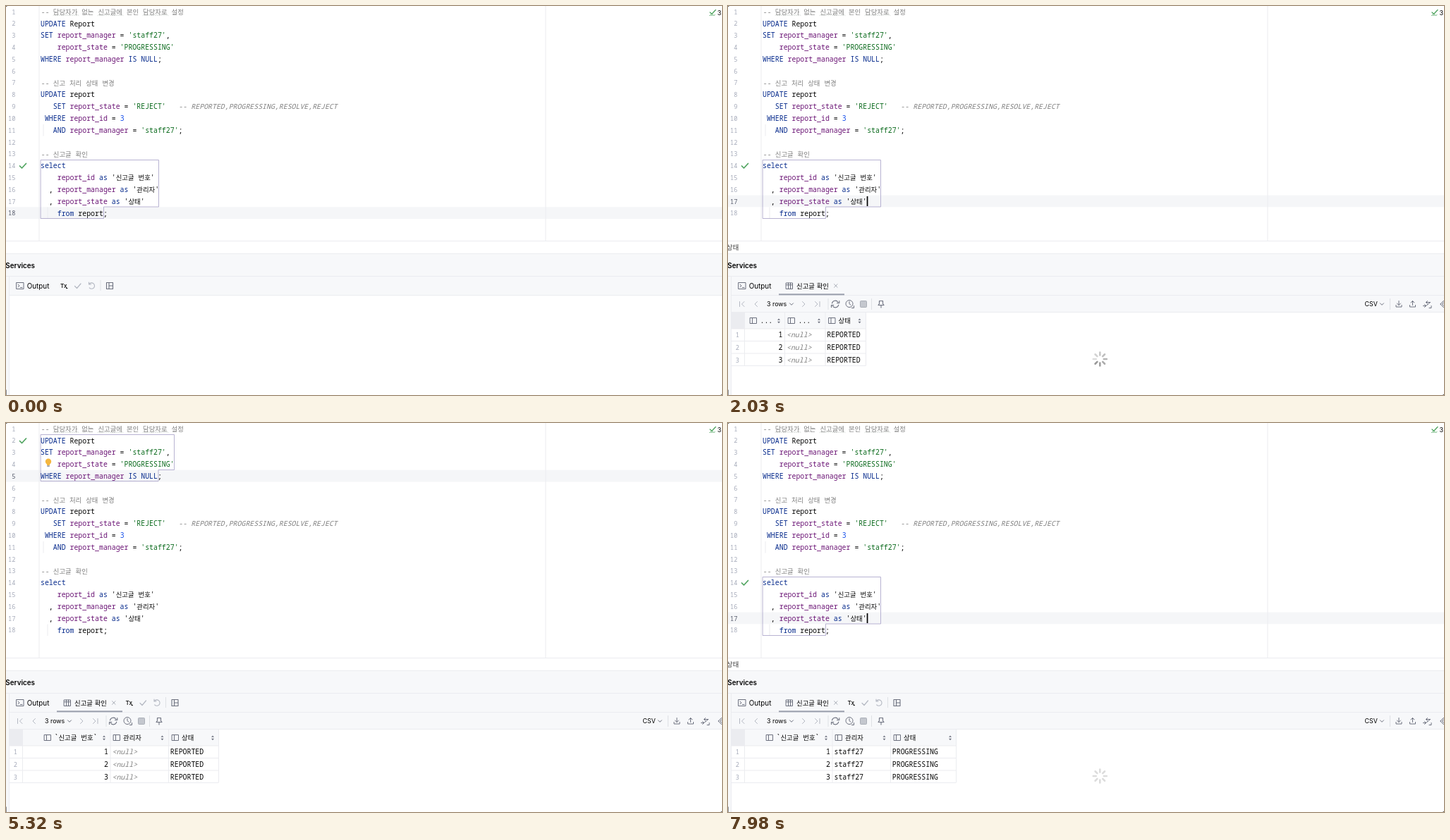
Write an HTML page that moves like this. It is 1015 px wide and 552 px high and loops after 8 s.

```html
<!DOCTYPE html>
<html lang="ko">
<head>
<meta charset="utf-8">
<title>SQL console</title>
<style>
html, body { margin: 0; width: 100%; height: 100%; overflow: hidden; background: #fff; }
svg { display: block; width: 100%; height: 100%; }
text { white-space: pre; font: 9.9px Inter, sans-serif; fill: #000; }
.m { font: 500 9.9px "Noto Sans Mono", monospace; fill: #080808; }
.n { font: 8.7px "Noto Sans Mono", monospace; fill: #a6abba; text-anchor: end; }
.n.on { fill: #555a6a; }
.h { font-family: "Noto Sans CJK KR", "Noto Sans CJK", sans-serif; font-size: 9.4px; font-style: normal; }
.k { fill: #062a8c; }
.f { fill: #6c1676; }
.s { fill: #0a6a1c; }
.d { fill: #1750eb; }
.c { fill: #808080; font-style: italic; font-weight: 400; }
.b { font-weight: 600; }
.mid { text-anchor: middle; }
.end { text-anchor: end; }
.sm { font-size: 8.9px; }
.tx { font-size: 8.2px; font-weight: 500; }
.link { fill: #315fbd; font-size: 9.7px; }
</style>
</head>
<body>
<svg id="stage" viewBox="0 0 1015 552"></svg>
<script>
const LINES = [
  "-- 담당자가 없는 신고글에 본인 담당자로 설정",
  "UPDATE Report",
  "SET report_manager = 'staff27',",
  "    report_state = 'PROGRESSING'",
  "WHERE report_manager IS NULL;",
  "",
  "-- 신고 처리 상태 변경",
  "UPDATE report",
  "   SET report_state = 'REJECT'   -- REPORTED,PROGRESSING,RESOLVE,REJECT",
  " WHERE report_id = 3",
  "   AND report_manager = 'staff27';",
  "",
  "-- 신고글 확인",
  "select",
  "    report_id as '신고글 번호'",
  "  , report_manager as '관리자'",
  "  , report_state as '상태'",
  "    from report;"
];
const LINE_H = 16.82, EDGE = "#ebecf0", PANEL = "#f7f8fa", ICON = "#6c707e", DIM = "#b4b8c2", GREEN = "#4fa45f";
const TOKENS = /(--.*)|('[^']*')|\b(UPDATE|SET|WHERE|IS|NULL|AND|select|as|from)\b|(report_\w+)|(\d+)/g;
const CLASSES = ["c", "s", "k", "f", "d"];

const esc = s => s.replace(/</g, "&lt;").replace(/>/g, "&gt;");
const hangul = s => s.replace(/[가-힣]+/g, w => `<tspan class="h">${w}</tspan>`);
const text = (x, y, s, cls = "") => `<text x="${x}" y="${y}" class="${cls}">${hangul(esc(s))}</text>`;
const rect = (x, y, w, h, fill, more = "") => `<rect x="${x}" y="${y}" width="${w}" height="${h}" fill="${fill}" ${more}/>`;
const path = (d, color = ICON, w = 1, more = "") =>
  `<path d="${d}" fill="none" stroke="${color}" stroke-width="${w}" stroke-linecap="round" stroke-linejoin="round" ${more}/>`;
const at = (x, y, body) => `<g transform="translate(${x} ${y})">${body}</g>`;
const group = (id, body) => `<g id="${id}">${body}</g>`;
const lineTop = n => (n - 1) * LINE_H - .6;

function highlight(s) {
  return s.replace(TOKENS, (all, ...parts) => {
    const i = parts.slice(0, 5).findIndex(p => p !== undefined);
    if (i === 1 && /[가-힣]/.test(all)) return hangul(all);
    return `<tspan class="${CLASSES[i]}">${hangul(all)}</tspan>`;
  });
}

const tick = path("M-4.5 .5L-1.5 3.5L4.5 -3", GREEN, 1.7);
const chevron = (x, y) => path(`M${x - 2.5} ${y - 1.2}l2.5 2.5l2.5 -2.5`);
const vline = (x, y, h, color = EDGE) => rect(x, y, 1, h, color);
const hline = (x, y, w, color = EDGE) => rect(x, y, w, 1, color);
const sortMark = x => `<path d="M${x - 2} 445.8l2 -2.4l2 2.4zM${x - 2} 447.8l2 2.4l2 -2.4z" fill="${ICON}"/>`;
const columnIcon = x => path(`M${x - 4.5} 442.5h9v8h-9zM${x - 1.5} 442.5v8`);

function code() {
  return LINES.map((s, i) => {
    const y = 11.7 + i * LINE_H;
    return `<text x="13.5" y="${y - .2}" class="n">${i + 1}</text><text x="49" y="${y}" class="m">${highlight(s)}</text>`;
  }).join("");
}

function squiggle(x, w) {
  let d = `M${x} 13.5`;
  for (let i = 0; i < w; i += 3) d += "l1.5 -1l1.5 1";
  return path(d, "#c9cfca", .7);
}

function popup(x, y, first, second) {
  return at(x, y,
    rect(0, 0, 316.5, 87.5, "#fff", 'rx="7" stroke="#b5b8c2" stroke-width=".8" filter="url(#shadow)"') +
    text(159.5, 19, "Statements", "b mid") +
    rect(.4, 30, 315.7, 18.5, "#d4e2ff") +
    text(.5, 43, first) + text(.5, 61.3, second) +
    `<path d="M.4 72.5h315.7v8q0 6.6 -6.6 6.6h-302.5q-6.6 0 -6.6 -6.6z" fill="${PANEL}"/>` +
    text(2, 83.3, "Customize", "link"));
}

// full-width lines, then a part of the line below them
function selection(first, count, endX) {
  const y = lineTop(first), h = count * LINE_H;
  return rect(49, y, 966, h, "#cbcbfd") + rect(49, y + h, endX - 49, LINE_H, "#cbcbfd") + rect(764.5, y, 1, h, "#e3e3fa");
}

const txTools =
  text(77, 400.2, "Tx", "tx") + path("M85.5 400.5h1.5", "#000", 1) +
  path("M97.5 397.5l3 3l5.5 -6.5", DIM, 1.2) +
  path("M118 394.5a4.2 4.2 0 1 1 .2 5.4M117.5 392v3h3", DIM, 1.1) +
  vline(133.5, 389, 15, "#dfe1e5") +
  path("M142.5 392.5h9v9h-9zM146 392.5v9M146 397h5.5", ICON, 1.1);

function resultBar() {
  const arrow = (x, up) => path(`M${x - 4} 424.5v2.5h8v-2.5M${x} 418.5v6M${x - 2.5} ${up ? 421 : 422}l2.5 ${up ? -2.5 : 2.5}l2.5 ${up ? 2.5 : -2.5}`);
  return rect(5, 410, 1010, 24.5, PANEL) + hline(5, 410, 1010) + hline(5, 434, 1010) +
    path("M82.5 393h9v8.5h-9zM82.5 395.8h9M85.5 393v8.5M88.5 393v8.5") +
    text(97, 400.5, "신고글 확인") + path("M150.5 394.7l4.6 4.6m0 -4.6l-4.6 4.6", "#a0a4af", .9) +
    rect(72, 408.3, 93, 2, "#9a9fad") +
    path("M16.5 419.5v7M23 419.5l-3.5 3.5l3.5 3.5M41.5 419.5l-3.5 3.5l3.5 3.5", DIM) +
    text(55, 426.3, "3 rows", "sm") + chevron(90, 423) +
    path("M105.5 419.5l3.5 3.5l-3.5 3.5M123.5 419.5l3.5 3.5l-3.5 3.5M130 419.5v7", DIM) +
    vline(141.5, 415, 16, "#dfe1e5") +
    path("M147.5 422a4.7 4.7 0 0 1 8.5 -1.8M156.8 424a4.7 4.7 0 0 1 -8.5 1.8M154.5 421.5h3.3v-3M149.8 424.5h-3.3v3", ICON, 1.1) +
    `<circle cx="172" cy="422.5" r="5" fill="none" stroke="${ICON}"/>` + path("M172 419.5v3.2l2 1.5M175.5 428.5h3v-3") +
    rect(187.5, 418.5, 9, 9, "#c4c7ce", 'rx="1" stroke="#9ea2ad" stroke-width=".8"') +
    vline(203, 415, 16, "#dfe1e5") +
    path("M214.5 418.5h5v4l1.5 2h-8l1.5 -2zM217 424.5v3.5", ICON, 1.1) +
    text(902.5, 426.3, "CSV", "sm") + chevron(927, 423) + vline(938, 415, 16, "#dfe1e5") +
    arrow(951, false) + arrow(970.5, true) +
    path("M985.5 425.5h4M987.5 423.5l2 2l-2 2M995.5 420.5h-6M991.5 418.5l-2 2l2 2M990 425l5 -4M994 428.5h3v-3") +
    path("M1010 423q4 -6 8 -5M1010 423q4 6 8 5") + `<circle cx="1014.5" cy="423" r="1.8" fill="none" stroke="${ICON}"/>`;
}

// edges: column borders; heads: [icon x, label x, label, sort mark x]
function table(edges, heads, manager, state) {
  const right = edges[3];
  let out = rect(5, 435, right - 5, 23, PANEL) + rect(5, 435, 18, 23, EDGE);
  for (const y of [457.5, 475, 492.5, 510]) out += hline(5, y, right - 5);
  for (const x of edges) out += vline(x, 435, 75.5);
  for (const [icon, x, label, mark] of heads)
    out += columnIcon(icon) + text(x, 450.3, label, "m") + sortMark(mark);
  for (let i = 0; i < 3; i++) {
    const y = 470.3 + i * 17.6;
    out += text(16, y, String(i + 1), "n") + text(edges[1] - 2.5, y, String(i + 1), "m end") +
      text(edges[1] + 3, y, manager, manager[0] === "<" ? "m c" : "m") + text(edges[2] + 2.8, y, state, "m");
  }
  return out;
}
const wideHeads = mark => [[59, 68.5, "`신고글 번호`", 139], [157, 166, "관리자", 221.5], [240, 249, "상태", mark]];

let spokes = "";
for (let i = 0; i < 8; i++)
  spokes += `<path d="M0 -5.5V-9.5" transform="rotate(${i * 45})" stroke="#777" stroke-width="2.6" stroke-linecap="round"/>`;

const beam = "M-3 -6.5Q0 -6.5 0 -4.5Q0 -6.5 3 -6.5M0 -4.5V4.5M-3 6.5Q0 6.5 0 4.5Q0 6.5 3 6.5M-1.8 2.5H1.8";

const stage = document.getElementById("stage");
stage.innerHTML =
  `<defs><filter id="shadow" x="-10%" y="-20%" width="120%" height="150%"><feDropShadow dx="0" dy="3" stdDeviation="4" flood-opacity=".25"/></filter></defs>` +
  rect(0, 0, 1015, 552, "#fff") +
  group("row", rect(0, 0, 1015, LINE_H, "#f5f6f8")) +
  vline(46.5, 0, 333) + vline(764.5, 0, 333) +
  group("select1", selection(2, 3, 216)) + group("select2", selection(14, 4, 138.5)) +
  vline(52.5, 168, 16.5) + vline(58.5, 285.5, 16.5) +
  group("box1", path("M49.5 16.5H238.5V66.5H216V82.5H49.5Z", "#b0abcd", .9)) +
  group("box2", path("M49.5 218.5H216.5V285H138.5V301.5H49.5Z", "#b0abcd", .9)) +
  squiggle(67, 34) + squiggle(130, 34) + squiggle(194, 34) + code() +
  group("caret", rect(196.7, 270, 1.7, 14, "#000")) +
  group("bulb", `<circle cx="60" cy="54.8" r="4.2" fill="#f4b63f"/>` + rect(58, 58, 4, 2, "#f4b63f") + rect(58.2, 60.4, 3.6, 1.4, "#7b7f8b")) +
  group("tick", tick) +
  rect(992, 0, 23, 16, "#fff") +
  path("M998 9l2.5 2.5l5.5 -6", GREEN, 1.3) + path("M997.5 13.5l1.5 -1l1.5 1l1.5 -1l1.5 1l1.5 -1", GREEN, .9) +
  text(1008.5, 12.5, "3", "sm") +
  hline(0, 333, 1015) + group("crumb", `<g opacity=".75">${text(-2, 346, "상태")}</g>`) +
  rect(0, 351, 1015, 59, PANEL) + hline(0, 351, 1015) + hline(0, 383, 1015) + hline(5, 410, 1010) +
  rect(0, 410, 4, 142, PANEL) + vline(4, 384, 168) +
  text(-.7, 371.8, "Services", "b") +
  path("M15 392.5h10v9h-10zM17 395l2 2l-2 2M20.5 399.5h2.5") + text(29.7, 400.7, "Output") +
  group("tools", txTools) +
  group("bar", resultBar()) +
  group("table1", table([23, 80, 137.5, 195], [[36, 45.5, "...", 72], [90, 99.5, "...", 129], [147.5, 156.5, "상태", 186.5]], "<null>", "REPORTED")) +
  group("table2", table([23, 147.5, 230, 301], wideHeads(293), "<null>", "REPORTED")) +
  group("table3", table([23, 147.5, 230, 323], wideHeads(315), "staff27", "PROGRESSING")) +
  group("spinner", at(527.3, 501, spokes)) +
  group("popup1", popup(221.8, 83.3, "UPDATE Report SET report_manager = 'staff27', repo...", "-- 담당자가 없는 신고글에 본인 담당자로 설정 UPDATE Report SET repor...")) +
  group("popup2", popup(197.8, 285.3, "select report_id as '신고글 번호' , report_manager as '관...", "-- 신고글 확인 select report_id as '신고글 번호' , report_m...")) +
  group("pointer", group("beam", path(beam, "#fff", 2.4) + path(beam, "#000", 1.1)) +
    group("arrow", `<path d="M0 0V12L2.8 9.5L4.7 13.5L6.5 12.7L4.7 8.8H8.5Z" fill="#000" stroke="#fff" stroke-width=".8"/>`)) +
  path("M.5 545v7", "#8d9096") + path("M0 .5h1M1014 551.5h1", "#555");

const el = {};
stage.querySelectorAll("g[id]").forEach(g => el[g.id] = g);
const numbers = [...stage.querySelectorAll("text.n")].slice(0, LINES.length);
const spokeEls = el.spinner.querySelectorAll("path");

const show = (id, on) => { el[id].style.display = on ? "" : "none"; };
const move = (id, x, y) => el[id].setAttribute("transform", `translate(${x} ${y})`);
const clamp = v => Math.min(1, Math.max(0, v));
const ease = v => v * v * (3 - 2 * v);

// from, hidden at, arrival, three curve points
const TRIPS = [
  [70, 910, 840, [470, 556], [300, 330], [214, 268]],
  [2800, 3570, 3360, [215, 270], [312, 160], [227, 74]],
  [5880, 6790, 6400, [227, 74], [322, 190], [215, 269]]
];

function pointer(t) {
  const trip = TRIPS.find(([from, to]) => t >= from && t < to);
  show("pointer", !!trip);
  if (!trip) return;
  const [from, , arrive, a, b, c] = trip;
  const u = ease(clamp((t - from) / (arrive - from))), v = 1 - u;
  const [x, y] = [0, 1].map(i => v * v * a[i] + 2 * u * v * b[i] + u * u * c[i]);
  show("beam", y < 334);
  show("arrow", y >= 334);
  move("pointer", x, y);
}

function draw(ms) {
  const t = Math.floor(ms % 8000 / 70) * 70;
  const on = (...spans) => spans.some(([a, b = 8000]) => t >= a && t < b);
  const line = t < 840 ? 18 : on([3360, 6580]) ? 5 : 17;
  move("row", 0, lineTop(line));
  numbers.forEach((n, i) => n.classList.toggle("on", i + 1 === line));
  show("select1", on([4480, 5110]));
  show("select2", on([1540, 1820], [7000, 7490]));
  show("popup1", on([4550, 5110]));
  show("popup2", on([1680, 1820], [7210, 7490]));
  show("box1", on([3570, 6790]));
  show("box2", !on([3570, 6790]));
  show("caret", on([840, 1540], [1820, 2450], [2590, 3360], [6580, 7000], [7490]));
  show("bulb", on([4200, 4480], [5320, 6790]));
  show("crumb", on([1050, 3710], [6860]));
  move("tick", 24, on([5180, 7560]) ? 25 : 226.5);
  show("tools", !on([1890, 2100]));
  move("tools", t < 1890 ? 0 : 92.5, 0);
  show("bar", on([1890]));
  show("table1", on([1960, 2100]));
  show("table2", on([2100, 7630]));
  show("table3", on([7630]));
  show("spinner", on([2030, 2590], [7630]));
  const step = Math.floor(t / 140);
  spokeEls.forEach((s, i) => s.setAttribute("opacity", t > 7000 ? .25 : .25 + .5 * ((i - step + 800) % 8) / 7));
  pointer(t);
}

const start = performance.now();
function loop() {
  draw(performance.now() - start);
  requestAnimationFrame(loop);
}
draw(0);
requestAnimationFrame(loop);
</script>
</body>
</html>
```
